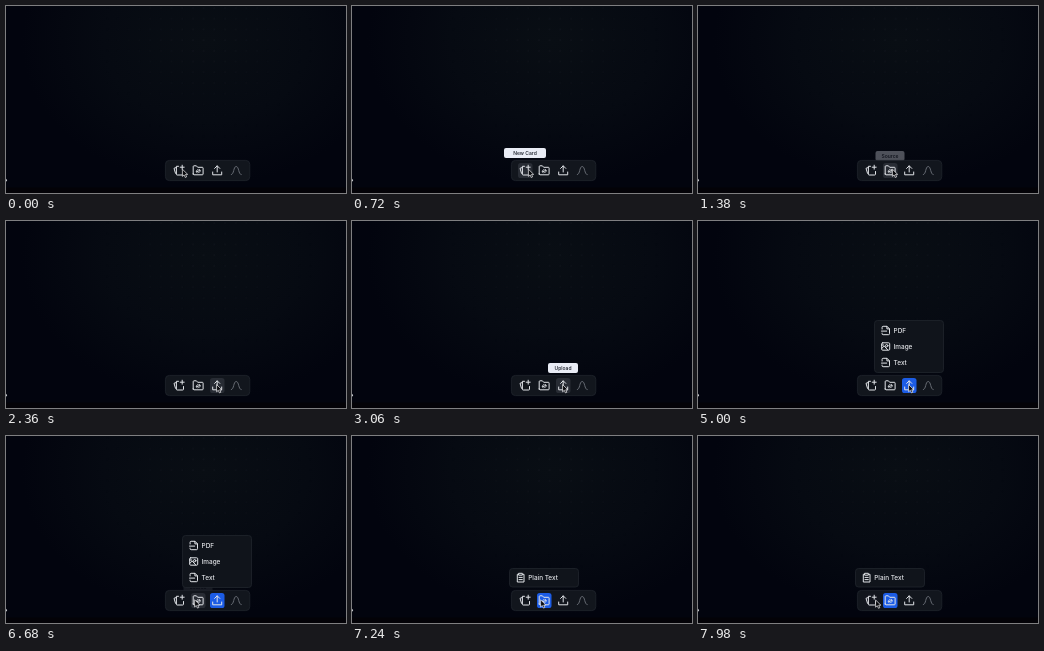
Write an HTML page that moves like this. It is 340 px wide and 187 px high and loops after 8 s.

```html
<!DOCTYPE html>
<html lang="en">
<head>
<meta charset="utf-8">
<title>Toolbar</title>
<style>
html, body { margin: 0; width: 100%; height: 100%; overflow: hidden; background: #02040e; }
svg { display: block; width: 100vw; height: 100vh; }
text { font: 500 6.4px Inter, "Liberation Sans", sans-serif; fill: #e4e6ea; }
.panel { fill: #10141b; stroke: #20252c; stroke-width: .8; }
.icon { fill: none; stroke: #e1e4e8; stroke-width: 1; stroke-linecap: round; stroke-linejoin: round; }
.tip rect { fill: #e9ecf5; }
.tip text { font-size: 5px; fill: #11151f; text-anchor: middle; }
</style>
</head>
<body>
<svg viewBox="0 0 340 187" preserveAspectRatio="none">
  <defs>
    <radialGradient id="glow" gradientUnits="userSpaceOnUse" cx="200" cy="35" r="185" gradientTransform="translate(0 8) scale(1 .78)">
      <stop offset="0" stop-color="#090e14"/>
      <stop offset=".55" stop-color="#060a12"/>
      <stop offset="1" stop-color="#02040e"/>
    </radialGradient>
    <radialGradient id="fade"><stop offset=".1" stop-color="#fff"/><stop offset="1" stop-color="#000"/></radialGradient>
    <pattern id="dots" width="10.7" height="10.7" patternUnits="userSpaceOnUse">
      <circle cx="5" cy="2" r=".55" fill="#1b2027"/>
    </pattern>
    <mask id="soft"><ellipse cx="200" cy="35" rx="110" ry="105" fill="url(#fade)"/></mask>
    <g id="file">
      <path d="M-3.6-1.5V-3.2Q-3.6-4.2-2.6-4.2H1.3L3.8-1.7V3.2Q3.8 4.2 2.8 4.2H-2.6Q-3.6 4.2-3.6 3.2V2.6M1.2-4V-1.6H3.6M-4.2.6H1"/>
    </g>
  </defs>
  <rect width="340" height="187" fill="url(#glow)"/>
  <rect width="340" height="181" fill="url(#dots)" mask="url(#soft)"/>
  <rect y="181.5" width="340" height="5.5" fill="#030207"/>
  <path d="M0 172.8L1.2 174.2L0 175.8Z" fill="#d5d7dc"/>

  <g id="tips"></g>

  <g id="upload">
    <rect class="panel" x="176.5" y="99.5" width="69" height="52" rx="3"/>
    <g class="icon">
      <use href="#file" x="187.7" y="109.5"/>
      <path d="M184-4" />
      <g transform="translate(187.7 125.5)">
        <rect x="-4" y="-3.7" width="8" height="7.4" rx="1"/>
        <circle cx="1" cy="-.8" r="1.2"/>
        <path d="M-3.8 1.8L-1.5-.5L2 3.4M-4-1.5H-2"/>
      </g>
      <use href="#file" x="187.7" y="141.5"/>
    </g>
    <text x="195.6" y="111.8">PDF</text>
    <text x="195.6" y="127.8">Image</text>
    <text x="195.6" y="143.8">Text</text>
  </g>

  <g id="source">
    <rect class="panel" x="157.5" y="132.5" width="69" height="18.5" rx="3"/>
    <path class="icon" d="M166.5 138.3H165.3V146H172V138.3H170.8M167 137.3H170.3V139.2H167ZM167 141.4H170.3M167 143.6H170.3"/>
    <text x="176.2" y="143.9">Plain Text</text>
  </g>

  <rect class="panel" x="159.4" y="154.4" width="84.4" height="20.2" rx="4" style="fill:#12161d"/>
  <g id="keys"></g>
  <g class="icon">
    <path d="M172.5 160.3H170.4V168.2Q170.4 169 171.2 169H176.7Q177.5 169 177.5 168.2V165.5M170.3 161.5L168 162.3L169.5 167.3M176.2 159.2V163.2M174.2 161.2H178.2"/>
    <path d="M187.2 168V160.6Q187.2 159.8 188 159.8H190.4L191.7 161.3H196.3Q197.1 161.3 197.1 162.1V168Q197.1 168.8 196.3 168.8H188Q187.2 168.8 187.2 168ZM191 166.6Q189.5 166 190.5 164.7L191.6 163.8M193 163.5Q195 163.7 194 165.4L192.7 166.7M191.2 165.8L193.4 164.4"/>
    <path d="M211.2 166V160M208.6 162.4L211.2 159.8L213.8 162.4M206.7 166V168.8H215.7V166"/>
    <path stroke="#666b73" d="M225.3 168.6C228.2 168.6 227.3 160.5 230.2 160.5S232.3 168.6 235.2 168.6"/>
  </g>
  <path id="cursor" d="M0 0V7.2L1.7 5.7L2.9 8.3L4.2 7.7L3.1 5.2H5.3Z" fill="#08090c" stroke="#f2f3f5" stroke-width=".7" stroke-linejoin="round"/>
</svg>
<script>
const LOOP = 8000, NS = "http://www.w3.org/2000/svg";
const $ = id => document.getElementById(id);
const clamp = v => Math.max(0, Math.min(1, v));
const ease = v => v * v * (3 - 2 * v);
const ramp = (t, start, length) => ease(clamp((t - start) / length));
const span = (t, a, b, rise = 140, fall = 120) => ramp(t, a, rise) * (1 - ramp(t, b, fall));

function add(parent, tag, attrs) {
  const el = document.createElementNS(NS, tag);
  for (const k in attrs) el.setAttribute(k, attrs[k]);
  return parent.appendChild(el);
}

// time, x, y of the pointer tip
const path = [
  [0, 176.4, 163.2], [860, 176.4, 163.2], [1180, 194.4, 163.2], [1940, 194.4, 163.2],
  [2240, 210.6, 163.6], [6240, 210.6, 163.6], [6600, 188.6, 163.8],
  [7660, 188.6, 163.8], [7980, 177.6, 164], [8000, 176.4, 163.2]
];

// hover and tooltip periods for each button
const buttons = [
  { x: 173, label: "New Card", width: 42, hover: [[20, 930], [7970, 8100]], tip: [[240, 880]] },
  { x: 192, label: "Source", width: 29, hover: [[1080, 2030], [6430, 6850]], tip: [[1305, 1960], [6645, 6850]], active: [6860, 9000] },
  { x: 211, label: "Upload", width: 30, hover: [[2120, 3500]], tip: [[2460, 3500]], active: [3510, 6860] }
];

for (const b of buttons) {
  const box = { x: b.x - 7, y: 157, width: 14.5, height: 15, rx: 2.6 };
  b.glow = add($("keys"), "rect", { ...box, fill: "#282c34" });
  b.lit = add($("keys"), "rect", { ...box, fill: "#1c5ce5" });
  b.bubble = add($("tips"), "g", { class: "tip" });
  add(b.bubble, "rect", { x: b.x - b.width / 2, y: 142, width: b.width, height: 10, rx: 2 });
  add(b.bubble, "text", { x: b.x, y: 148.9 }).textContent = b.label;
}

const level = (t, list, rise, fall) => Math.max(...list.map(([a, b]) => span(t, a, b, rise, fall)));

function pointer(t) {
  const i = path.findIndex(p => p[0] > t), [t0, x0, y0] = path[i - 1], [t1, x1, y1] = path[i];
  const k = ease((t - t0) / (t1 - t0));
  return [x0 + (x1 - x0) * k, y0 + (y1 - y0) * k];
}

function show(el, alpha, lift = 0) {
  el.setAttribute("opacity", alpha);
  el.setAttribute("transform", `translate(0 ${lift * (1 - alpha)})`);
}

function draw(now) {
  const t = now % LOOP;
  for (const b of buttons) {
    show(b.glow, level(t, b.hover, 80, 80));
    show(b.lit, b.active ? span(t, ...b.active, 80, 80) : 0);
    show(b.bubble, level(t, b.tip, 200, 120), 4.5);
  }
  show($("upload"), span(t, 3530, 6860), 4);
  show($("source"), span(t, 6900, 9000), 4);
  $("cursor").setAttribute("transform", `translate(${pointer(t)})`);
  requestAnimationFrame(draw);
}
draw(0);
</script>
</body>
</html>
```
